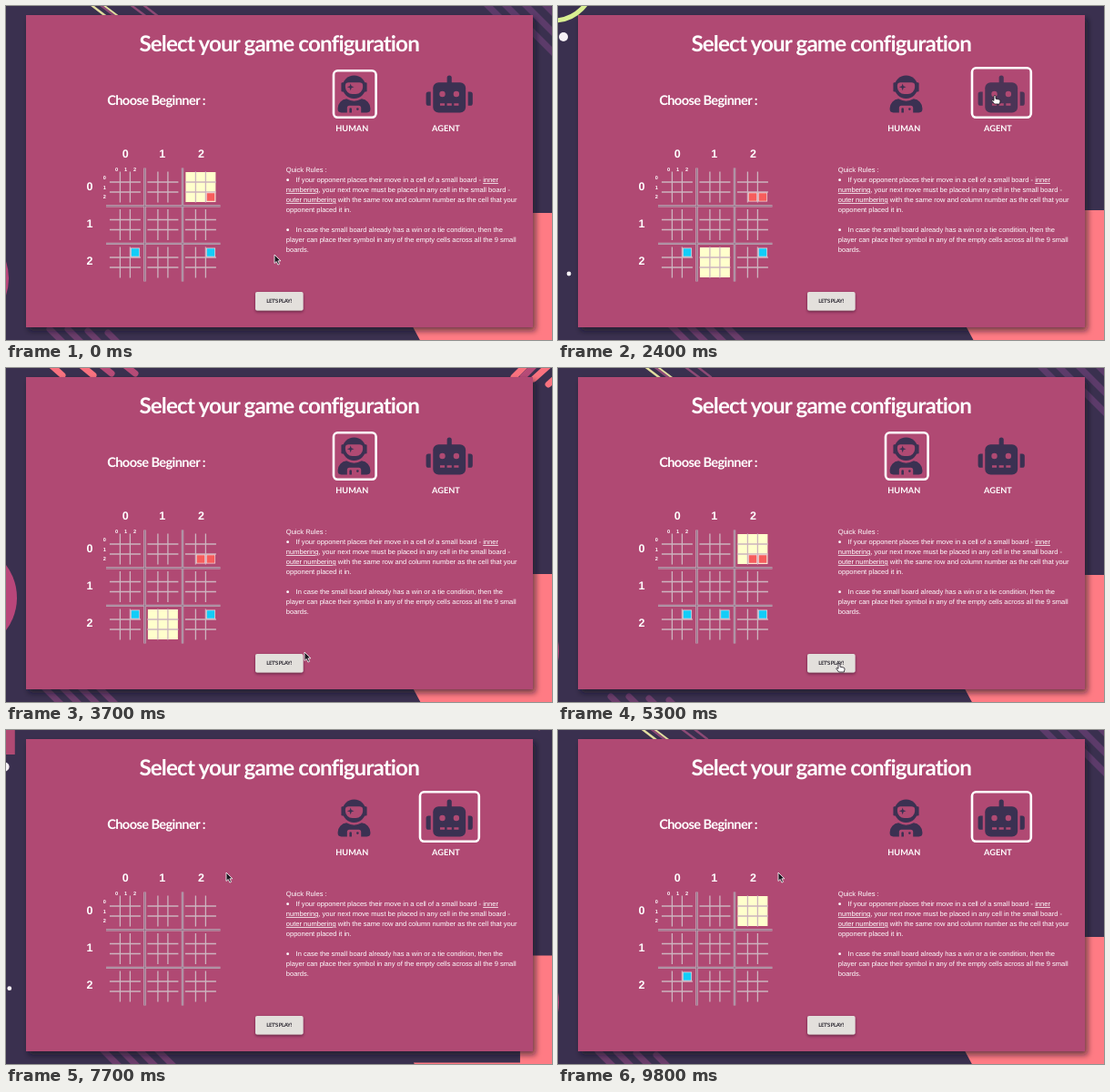
Animation, 600 px wide and 368 px high, one loop 9.9 s. Source, as an HTML page:

```html
<!DOCTYPE html>
<html lang="en">
<head>
<meta charset="utf-8">
<title>Game configuration</title>
<style>
html, body { margin: 0; height: 100%; overflow: hidden; background: #3a304f; }
svg { display: block; width: 100vw; height: 100vh; }
text { fill: #fff; text-rendering: geometricPrecision; white-space: pre; }
.head { font-family: Lato, sans-serif; font-weight: 700; text-anchor: middle; }
.num { font: 700 12.5px "Liberation Sans", Arial, sans-serif; text-anchor: middle; }
.tiny { font-size: 5.6px; }
.rules { font: 7.54px "Liberation Sans", Arial, sans-serif; }
.rules .u { text-decoration: underline; }
.pick { fill: none; stroke: #fff; stroke-width: 2.6; }
.icon { fill: #3b3152; }
.hole { fill: #b04a73; }
</style>
</head>
<body>
<svg viewBox="0 0 600 368" preserveAspectRatio="none">
  <defs>
    <filter id="lift" x="-10%" y="-10%" width="120%" height="130%">
      <feDropShadow dx="3" dy="4" stdDeviation="3" flood-color="#140d22" flood-opacity=".6"/>
    </filter>
    <filter id="soft" x="-20%" y="-30%" width="140%" height="190%">
      <feDropShadow dx="0" dy="1.5" stdDeviation="1.5" flood-color="#301028" flood-opacity=".6"/>
    </filter>
  </defs>

  <rect width="600" height="368" fill="#3a304f"/>
  <g id="sky">
    <g id="bars" fill="none" stroke="#5c3b6a" stroke-width="7" stroke-linecap="round">
      <path d="M518-12l40 40M536-14l80 80M560-12l60 60M584-10l40 40"/>
    </g>
    <g id="floor" fill="none" stroke="#6b3d6b" stroke-width="7" stroke-linecap="round">
      <path d="M118 346l34 34M138 346l34 34M160 348l30 30M182 350l30 30"/>
    </g>
    <circle id="planet" r="60" fill="#b9467a"/>
    <circle id="ring" r="44" fill="none" stroke="#d9ef92" stroke-width="5"/>
    <g id="rays" fill="none" stroke-width="2.4" stroke-linecap="round">
      <path d="M82-10l34 26M100-6l32 24" stroke="#e3dfa0"/>
      <path d="M92-10l34 26M128-8l32 24M142-8l26 20" stroke="#8d4a76"/>
    </g>
    <g id="dashes" fill="none" stroke-width="7" stroke-linecap="round">
      <path d="M34-6l18 16M64-8l22 18M548 12l16-16M570 14l20-18M586 20l22-20" stroke="#f9727f"/>
      <path d="M86-8l20 16M112-8l20 16M558 12l16-16" stroke="#b64b77"/>
    </g>
    <path id="corner" d="M0 0H40V27H0z" fill="#b04a73"/>
    <circle id="star" r="5" fill="#f6f1f6"/>
    <circle id="spark" r="2.4" fill="#f6f1f6"/>
    <path id="coral" d="M443 118L457 144H640V0H560V118z" fill="#ff7b84"/>
  </g>

  <rect x="22" y="10" width="557" height="344" fill="#b04a73" filter="url(#lift)"/>

  <text class="head" x="300.2" y="49.5" font-size="24.2" letter-spacing="-.85">Select your game configuration</text>
  <text class="head" x="165" y="108.5" font-size="14.6" letter-spacing="-.6">Choose Beginner :</text>
  <text class="head" x="380.3" y="137.6" font-size="9.2">HUMAN</text>
  <text class="head" x="483.4" y="137.6" font-size="9.2">AGENT</text>

  <g id="human" class="icon" transform="translate(364.6 76.5) scale(.08)">
    <circle cx="224" cy="160" r="160"/>
    <rect x="48" y="96" width="352" height="128" rx="16"/>
    <path class="hole" d="M104 136q0-40 48-40h144q48 0 48 40v24a96 96 0 0 1-96 96h-48a96 96 0 0 1-96-96z"/>
    <path d="M176 208l-12-36-36-12 36-12 12-36 12 36 36 12-36 12z"/>
    <path d="M120 321q104 62 208 0a134 134 0 0 1 120 133v10q0 48-48 48h-80v-64q0-32-32-32H160q-32 0-32 32v64H48q-48 0-48-48v-10a134 134 0 0 1 120-133z"/>
    <path d="M160 512v-48a16 16 0 0 1 32 0v48z"/>
    <circle cx="272" cy="464" r="16"/>
  </g>
  <g id="agent" class="icon" transform="translate(461.6 76.5) scale(.08)">
    <rect x="288" width="64" height="140" rx="32"/>
    <rect x="96" y="96" width="448" height="416" rx="76"/>
    <path d="M64 224v192H32q-32 0-32-32V256q0-32 32-32zM576 224v192h32q32 0 32-32V256q0-32-32-32z"/>
    <g class="hole">
      <circle cx="224" cy="256" r="40"/><circle cx="416" cy="256" r="40"/>
      <path d="M192 384h64v32h-64zM288 384h64v32h-64zM384 384h64v32h-64z"/>
    </g>
  </g>
  <rect id="pickHuman" class="pick" x="360" y="71.3" width="46.6" height="51.5" rx="4.5"/>
  <rect id="pickAgent" class="pick" x="455" y="68.3" width="64.8" height="54.5" rx="4.5"/>

  <g id="board"></g>
  <g id="rules" class="rules"></g>

  <rect x="274" y="315" width="52.6" height="20.4" rx="2" fill="#e3e0dc" filter="url(#soft)"/>
  <text class="head" x="300" y="327.4" font-size="5.9" letter-spacing="-.4" style="fill:#26222c">LET'S PLAY!</text>

  <g id="cursor">
    <path id="arrow" d="M0 0v9.5l2.2-2 1.7 3.6 1.7-.8-1.7-3.5h3z" fill="#1c1620" stroke="#fff" stroke-width=".8"/>
    <path id="hand" d="M-1 0q1-1.4 2 0v3.2l4 .9q1.2.4 1 1.8l-.7 3.1h-5.6l-2.9-3.6q0-1.2 1.2-.8l1 .8z" fill="#fff" stroke="#1c1620" stroke-width=".8"/>
    <path id="beam" d="M-2-4.5q2 0 2 1v7q0 1-2 1M2-4.5q-2 0-2 1M2 4.5q-2 0-2-1" fill="none" stroke="#1c1620" stroke-width="1"/>
  </g>
</svg>

<script>
const LOOP = 9900, DRIFT = LOOP / 2;
const $ = id => document.getElementById(id);
const show = (el, on) => el.style.display = on ? '' : 'none';
const tag = (name, attrs, body = '') =>
  `<${name} ${Object.entries(attrs).map(([k, v]) => `${k}="${v}"`).join(' ')}>${body}</${name}>`;

// Board geometry
const SIZE = 33, STEP = 41.5, CELL = 11;
const left = c => 114.4 + STEP * c;
const top_ = r => 183 + STEP * r;
const three = [0, 1, 2];

function buildBoard() {
  let html = tag('rect', { id: 'won', x: 193.8, y: 179, width: 41.5, height: 40.5, fill: '#ffd9d0' });
  for (const r of three) for (const c of three)
    html += tag('rect', { id: `lit${r}${c}`, x: left(c), y: top_(r), width: SIZE, height: SIZE, fill: '#ffffcc' });

  let fine = '';
  for (const r of three) for (const c of three) for (const k of [1, 2])
    fine += `M${left(c) + k * CELL} ${top_(r) - .5}v${SIZE + 1}M${left(c) - .5} ${top_(r) + k * CELL}h${SIZE + 1}`;
  html += tag('path', { d: fine, stroke: '#cdb4bf', 'stroke-width': 1.3 });

  const wide = 'M152.5 178.5v125M194 178.5v125M110 220.4h125.5M110 261.9h125.5';
  html += tag('path', { d: wide, stroke: '#c7afbc', 'stroke-width': 2.4 });
  html += tag('path', { d: wide, stroke: '#8d6a83', 'stroke-width': .8 });

  const mark = (id, r, c, i, j, fill) => tag('rect', {
    id, x: left(c) + j * CELL + .9, y: top_(r) + i * CELL + .9, width: 9.4, height: 9.2,
    fill, stroke: '#f3d9dc', 'stroke-width': .7
  });
  three.forEach(n => {
    html += mark('red' + n, 0, 2, 2, 2 - n, '#f65d5c');
    html += mark('blue' + n, 2, [0, 2, 1][n], 0, 2, '#12cdf8');
  });

  const label = (x, y, n, cls) => tag('text', { x, y, class: cls }, n);
  three.forEach(n => {
    html += label(131.3 + 41.6 * n - (n == 1 ? 1.2 : 0), 167.4, n, 'num');
    html += label(92, 202.5 + 41 * n, n, 'num');
    html += label(121.5 + 10 * n, 182.2, n, 'num tiny');
    html += label(108.3, 191.2 + 10.4 * n, n, 'num tiny');
  });
  $('board').innerHTML = html;
}

function buildRules() {
  const u = s => `<tspan class="u">${s}</tspan>`;
  const lines = [
    'Quick Rules :',
    `*If your opponent places their move in a cell of a small board - ${u('inner')}`,
    `${u('numbering')}, your next move must be placed in any cell in the small board -`,
    `${u('outer numbering')} with the same row and column number as the cell that your`,
    'opponent placed it in.',
    '',
    '*In case the small board already has a win or a tie condition, then the',
    'player can place their symbol in any of the empty cells across all the 9 small',
    'boards.'
  ];
  $('rules').innerHTML = lines.map((s, i) => {
    const y = 183.2 + 11 * i, dot = s[0] == '*';
    return (dot ? tag('circle', { cx: 309.6, cy: y - 2.5, r: 1.4, fill: '#fff' }) : '') +
      tag('text', { x: dot ? 318.6 : 307.8, y }, dot ? s.slice(1) : s);
  }).join('');
}

// start, highlighted board, red marks, blue marks
const turns = [
  [0, '02', 1, 2], [2300, '21', 1 + 1, 2], [3900, '02', 2, 3],
  [5500, '20', 3, 3], [7100, '', 0, 0], [8700, '02', 0, 1]
];

function drawTurn(t) {
  const [, lit, reds, blues] = turns.findLast(s => t >= s[0]);
  three.forEach(r => {
    show($('red' + r), r < reds);
    show($('blue' + r), r < blues);
    three.forEach(c => show($(`lit${r}${c}`), lit == `${r}${c}`));
  });
  show($('won'), reds == 3);
}

function between(times, t, ease = k => k) {
  let i = times.findLastIndex(s => t >= s);
  i = Math.min(i, times.length - 2);
  const k = Math.min(1, (t - times[i]) / (times[i + 1] - times[i]));
  return [i, ease(k)];
}
const mix = (a, b, k) => a.map((v, n) => v + (b[n] - v) * k);

// Drifting backdrop: one place per key time
const keys = [0, 350, 2050, 2400, 3250, 3700, 4850, DRIFT];
const pts = s => s.split(' ').map(p => p.split(',').map(Number));
const drift = {
  bars: pts('0,0 -6,-8 -10,-46 20,-90 60,-90 40,-60 2,-2'),
  floor: pts('-70,10 -60,16 -4,2 0,0 -40,4 -82,0 -74,8'),
  planet: pts('-57,300 -59,312 -90,380 -90,140 -53,213 -48,253 -59,300'),
  ring: pts('-70,-70 -60,-62 0,-22 -5,-28 -60,-70 -80,-80 -75,-75'),
  rays: pts('0,0 0,-2 40,-40 20,-50 -30,-40 -20,-30 -4,-2'),
  dashes: pts('0,-60 0,-60 0,-50 0,-40 0,0 10,-2 0,-50'),
  corner: pts('-60,0 -60,0 -60,0 -50,0 -2,0 -42,0 -60,0'),
  star: pts('-14,10 -14,20 6,35 6,34 -12,50 -14,40 -14,10'),
  spark: pts('-8,330 -8,326 10,303 12,295 -8,270 -8,260 -8,330'),
  coral: pts('0,228 0,228 0,225 0,225 12,282 0,227 0,228')
};

function drawSky(t) {
  const [i, k] = between(keys, t % DRIFT);
  for (const id in drift) {
    const p = drift[id];
    $(id).setAttribute('transform', `translate(${mix(p[i], p[(i + 1) % p.length], k)})`);
  }
}

// Pointer: time, x, y
const path = [
  [0, 295, 274], [1300, 295, 274], [2000, 480, 99], [2500, 480, 99], [2950, 384, 100],
  [3200, 384, 100], [3700, 328, 313], [4400, 309, 326], [5500, 309, 326], [6200, 486, 100],
  [6500, 486, 100], [7000, 308, 206], [7500, 242, 157], [LOOP, 242, 157]
];
const inside = ([x, y], x0, y0, x1, y1) => x >= x0 && x <= x1 && y >= y0 && y <= y1;

function drawPointer(t) {
  const [i, k] = between(path.map(p => p[0]), t, k => k * k * (3 - 2 * k));
  const at = mix(path[i].slice(1), path[i + 1].slice(1), k);
  const onHuman = inside(at, 360, 71, 407, 123), onAgent = inside(at, 455, 68, 520, 123);
  const hand = onHuman || onAgent || inside(at, 274, 315, 327, 335);
  const beam = inside(at, 307, 176, 563, 273);
  $('cursor').setAttribute('transform', `translate(${at})`);
  show($('hand'), hand);
  show($('beam'), beam);
  show($('arrow'), !hand && !beam);
  $('human').style.opacity = onHuman ? .86 : 1;
  $('agent').style.opacity = onAgent ? .86 : 1;

  const agent = t >= 2200 && t < 3050 || t >= 6300;
  show($('pickAgent'), agent);
  show($('pickHuman'), !agent);
}

buildBoard();
buildRules();
const start = performance.now();
function frame() {
  const t = Math.floor((performance.now() - start) % LOOP / 100) * 100;
  drawSky(t);
  drawTurn(t);
  drawPointer(t);
  requestAnimationFrame(frame);
}
frame();
</script>
</body>
</html>
```
